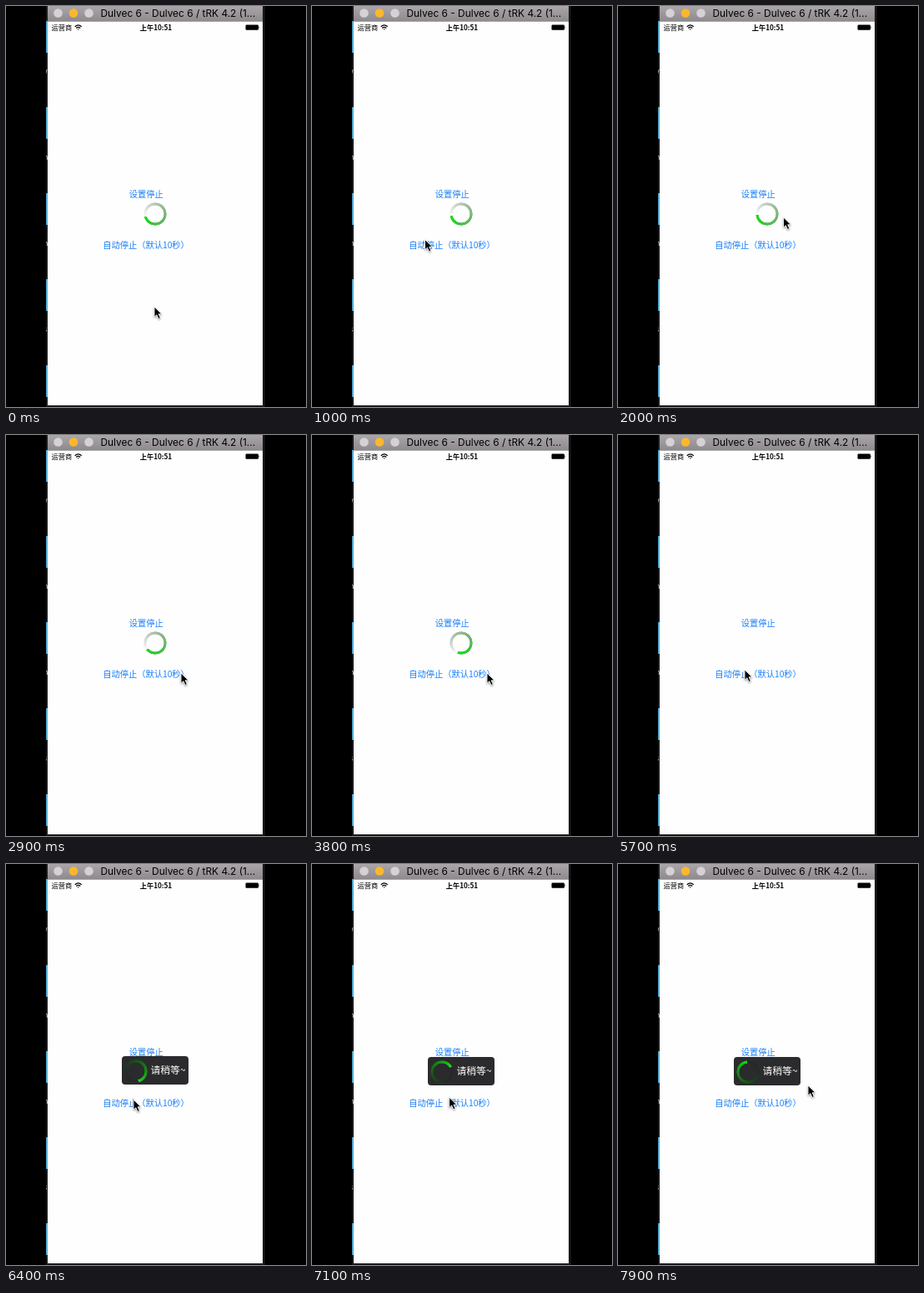
Animation, 360 px wide and 480 px high, one loop 8000 ms. Source, as an HTML page:

```html
<!DOCTYPE html>
<html lang="zh">
<head>
<meta charset="utf-8">
<style>
  html, body { margin: 0; width: 100%; height: 100%; overflow: hidden; background: #000; }
  svg { position: absolute; left: 0; top: 0; }
  text { font-family: "Noto Sans CJK SC", "Noto Sans CJK", sans-serif; }
  .title { font: 11.9px Inter, sans-serif; }
  .status { font-size: 8.2px; }
  .link { font-size: 10.25px; fill: #157efb; }
  .spinner {
    position: absolute; top: 234.5px; width: 28px; height: 28px; border-radius: 50%;
    -webkit-mask: radial-gradient(closest-side, #0000 10.1px, #000 10.7px, #000 13.4px, #0000 14px);
    mask: radial-gradient(closest-side, #0000 10.1px, #000 10.7px, #000 13.4px, #0000 14px);
  }
  #loose { left: 165px; }
  #boxed { left: 3px; top: 4px; }
  #hud { position: absolute; left: 139px; top: 231px; width: 80px; height: 34px; border-radius: 4px; background: #2b2b2d; }
</style>
</head>
<body>
<svg width="360" height="480">
  <defs>
    <linearGradient id="bar" x2="0" y2="1">
      <stop stop-color="#aaa6aa"/><stop offset="1" stop-color="#8d898d"/>
    </linearGradient>
    <clipPath id="sliver"><path d="M48 18h2v460h-2z"/></clipPath>
  </defs>
  <path d="M48 0h262.500v480H48z" fill="#1b1b1d"/>
  <g id="list" clip-path="url(#sliver)"></g>
  <path d="M50 0h258v18.500H50z" fill="url(#bar)"/>
  <path d="M50 18.500h258V478H50z" fill="#fefefe"/>
  <g fill="#d5d1d5">
    <circle cx="62.500" cy="8.500" r="5.300"/>
    <circle cx="81" cy="8.500" r="5.300" fill="#fdb72c"/>
    <circle cx="99.500" cy="8.500" r="5.300"/>
  </g>
  <text class="title" x="113.500" y="13">Dulvec 6 - Dulvec 6 / tRK 4.2 (1...</text>
  <text class="status" x="54.500" y="28.800">运营商</text>
  <g fill="none" stroke="#000" stroke-width="1.200">
    <path d="M82.700 24.700q4-3.600 8 0M84.200 26.500q2.500-2.200 5 0"/>
    <path d="M85.500 27.500h2.400l-1.200 1.300z" fill="#000" stroke="none"/>
  </g>
  <text class="status" x="180" y="28.800" text-anchor="middle" font-weight="700">上午10:51</text>
  <rect x="287.500" y="22.500" width="15.500" height="6.200" rx="1.200"/>
  <path d="M303.600 24.300q1.400 1.300 0 2.600z"/>
  <text class="link" x="147.700" y="229.200">设置停止</text>
  <text class="link" x="116.200" y="289.900">自动停止（默认10秒）</text>
</svg>
<div id="loose" class="spinner"></div>
<div id="hud">
  <div id="boxed" class="spinner"></div>
  <svg width="80" height="34"><text x="34.500" y="21" font-size="11.800" fill="#fff">请稍等~</text></svg>
</div>
<svg width="360" height="480">
  <path id="cursor" d="M0 0V12.300L2.900 9.700 5 14.500 7.300 13.500 5.200 8.800H9z"
        stroke="#fff" stroke-width=".9" style="filter:drop-shadow(0 1px 1px #0006)"/>
</svg>
<script>
const $ = id => document.getElementById(id);
const LOOP = 8000, STEP = 100, SPIN = 0.3645;
const STOP_AT = 4800, HUD_AT = 6200;

// time, x, y of the pointer tip
const path = [
  [0, 178, 360], [300, 178, 360], [1000, 135.500, 279.500], [2000, 198.500, 253],
  [2800, 210, 285], [4900, 210, 285], [5700, 152, 281], [6400, 153, 282],
  [6900, 153, 282], [7700, 228, 265], [LOOP, 228, 265]
];

$('list').innerHTML = [...'ynns '].map((c, i) => {
  const y = 18 + 103 * i;
  return `<path d="M48 ${y}h2v38h-2z" fill="#55acd0"/>
    <text x="45" y="${y + 63}" font-size="9" fill="#ddd">${c}</text>`;
}).join('');

// Black and clear at the tail, solid green at the head.
const stops = Array.from({length: 17}, (_, i) => {
  const k = i / 16;
  return `rgba(${20 * k},${222 * k},${20 * k},${k})`;
}).join();

const spin = (id, angle) =>
  $(id).style.background = `conic-gradient(from ${angle}deg, ${stops})`;

function pointer(t) {
  const i = path.findIndex(p => p[0] > t);
  const [t0, x0, y0] = path[i - 1], [t1, x1, y1] = path[i];
  const u = (t - t0) / (t1 - t0), k = u * u * (3 - 2 * u);
  return `translate(${x0 + (x1 - x0) * k} ${y0 + (y1 - y0) * k})`;
}

function draw(t) {
  $('loose').hidden = t >= STOP_AT;
  spin('loose', 255 + t * SPIN);
  const age = t - HUD_AT;
  $('hud').style.opacity = age < 0 ? 0 : Math.min(1, 0.5 + age / 400);
  $('hud').style.transform = `translateY(${Math.min(0, age / 200 - 2)}px)`;
  spin('boxed', 167 + (t - 6400) * SPIN);
  $('cursor').setAttribute('transform', pointer(t));
}

const start = performance.now();
function tick() {
  const t = (performance.now() - start) % LOOP;
  draw(Math.floor(t / STEP) * STEP);
  requestAnimationFrame(tick);
}
tick();
</script>
</body>
</html>
```
